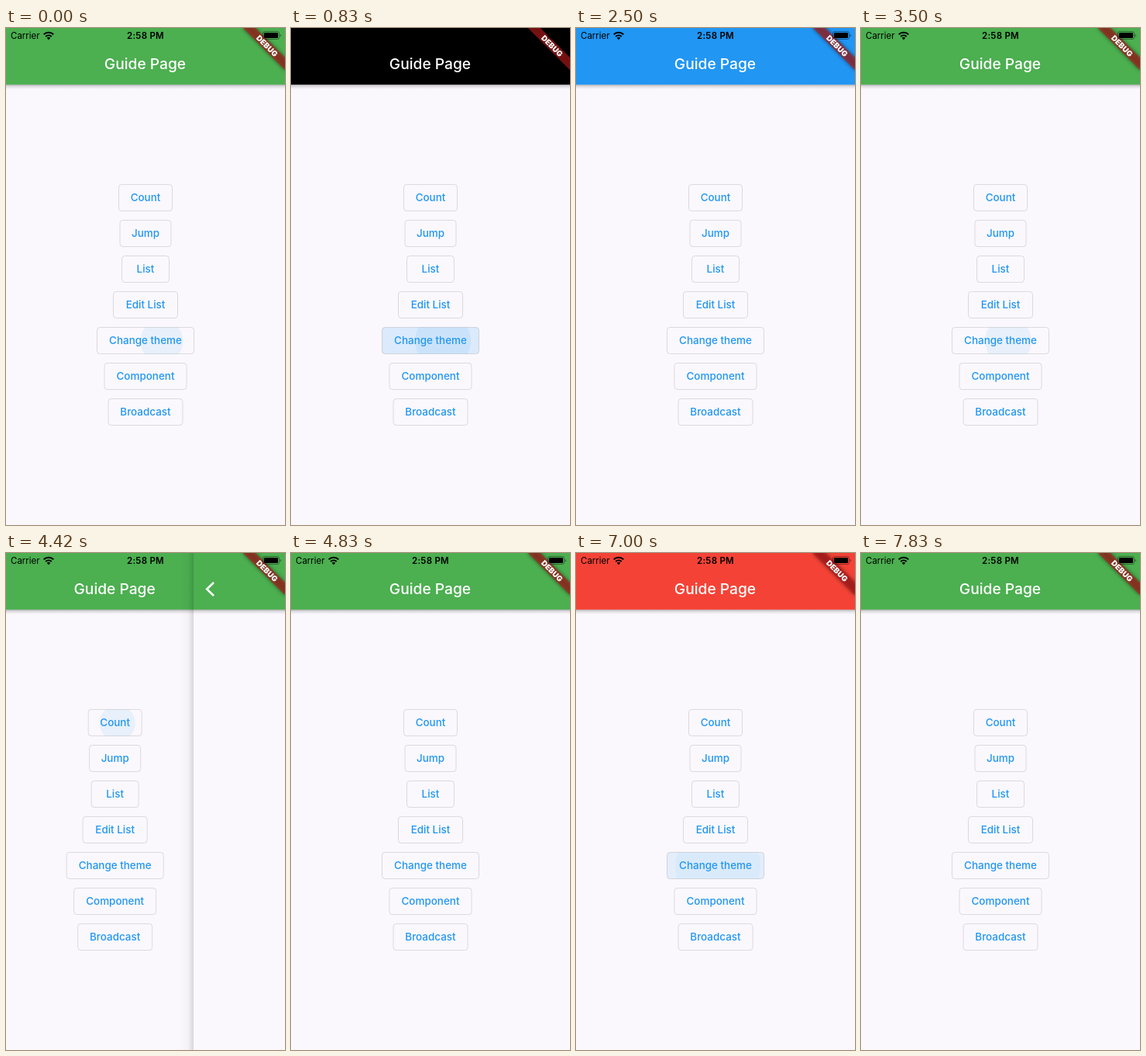
An HTML page for the animation above (8000 ms loop, 360 by 640 pixels).

```html
<!DOCTYPE html>
<html lang="en">
<head>
<meta charset="utf-8">
<title>Guide Page</title>
<style>
html, body { margin: 0; width: 100%; height: 100%; overflow: hidden; background: #faf8fc; }
svg { display: block; width: 360px; height: 640px; font-family: Inter, Roboto, sans-serif; }
.label { font-size: 13.44px; font-weight: 500; fill: #2196f3; text-anchor: middle; }
.title { font-size: 19.2px; font-weight: 500; fill: #fff; text-anchor: middle; }
.status { font-size: 11.5px; }
</style>
</head>
<body>
<svg viewBox="0 0 360 640">
  <defs>
    <linearGradient id="drop" x1="0" y1="0" x2="0" y2="1">
      <stop offset="0" stop-opacity=".3"/>
      <stop offset=".35" stop-opacity=".12"/>
      <stop offset="1" stop-opacity="0"/>
    </linearGradient>
    <linearGradient id="edge">
      <stop offset="0" stop-opacity="0"/>
      <stop offset=".6" stop-opacity=".025"/>
      <stop offset="1" stop-opacity=".14"/>
    </linearGradient>
    <filter id="soft" x="-20%" y="-80%" width="140%" height="260%">
      <feGaussianBlur stdDeviation="2.6"/>
    </filter>
  </defs>

  <g id="guide">
    <rect width="360" height="640" fill="#faf8fc"/>
    <rect y="72.9" width="360" height="6" fill="url(#drop)"/>
    <rect class="bar" width="360" height="72.9"/>
    <text class="title" x="179.5" y="53">Guide Page</text>
    <g id="buttons"></g>
  </g>

  <g id="page">
    <rect x="-18" width="18" height="640" fill="url(#edge)"/>
    <rect width="360" height="640" fill="#faf8fc"/>
    <rect y="72.9" width="360" height="6" fill="url(#drop)"/>
    <rect class="bar" width="360" height="72.9"/>
    <path d="M26 38 17.2 46.5 26 55" fill="none" stroke="#fff" stroke-width="2.6"/>
  </g>

  <g transform="translate(360 0) rotate(45)">
    <rect x="-38.4" y="26.9" width="76.8" height="11.5" opacity=".5" filter="url(#soft)"/>
    <rect x="-38.4" y="26.9" width="76.8" height="11.5" fill="#b71c1c" fill-opacity=".63"/>
    <text y="36.2" font-size="9.8" font-weight="900" fill="#fff" text-anchor="middle">DEBUG</text>
  </g>

  <g class="status">
    <text x="6" y="14">Carrier</text>
    <text x="180" y="14" font-weight="600" letter-spacing=".25" text-anchor="middle">2:58 PM</text>
    <g fill="none" stroke="#000" stroke-width="2">
      <path d="M48.7 8.3a9.2 9.2 0 0 1 12.6 0M51.2 11a5.6 5.6 0 0 1 7.6 0"/>
    </g>
    <path d="M55 15.2 52.8 12.8a3.2 3.2 0 0 1 4.4 0Z"/>
    <rect x="331.5" y="4.5" width="21" height="10" rx="2.4" fill="none" stroke="#000" stroke-opacity=".4"/>
    <rect x="333" y="6" width="18" height="7" rx="1.2"/>
    <path d="M353.7 7.8a1.9 1.9 0 0 1 0 3.6Z" fill-opacity=".45"/>
  </g>
</svg>
<script>
const LOOP = 8000, STEP = 1000 / 12;
const GREEN = '#4caf50', RED = '#f44336', BLACK = '#000', BLUE = '#2196f3';
const THEMES = [GREEN, RED, BLACK, BLUE];
const COUNT = 0, THEME = 4;

const BUTTONS = [
  ['Count', 69], ['Jump', 66], ['List', 61], ['Edit List', 83],
  ['Change theme', 125], ['Component', 106], ['Broadcast', 96]
];

// Each press: step, button, touch x, first radius
const PRESSES = [
  [0, THEME, 201, 27.5],
  [8, THEME, 196, 28], [10, THEME, 196, 36], [12, THEME, 198, 30],
  [13, THEME, 200, 30], [15, THEME, 201, 28], [17, THEME, 201, 30],
  [25, THEME, 199, 30], [42, THEME, 190, 30],
  [53, COUNT, 183, 23],
  ...Array.from({ length: 8 }, (_, i) => [75 + 2 * i, THEME, 183, i ? 30 : 36])
];
const SPLASH = [.085, .05];
const FILL = [0, .1, .14, .1, .05];
const PUSH = 53, PUSH_STEPS = 5;

const byId = id => document.getElementById(id);
const bars = document.querySelectorAll('.bar');

function add(parent, tag, attrs) {
  const node = document.createElementNS('http://www.w3.org/2000/svg', tag);
  for (const key in attrs) node.setAttribute(key, attrs[key]);
  return parent.appendChild(node);
}

const views = BUTTONS.map(([name, width], i) => {
  const group = byId('buttons');
  const box = { x: 180 - width / 2, y: 201.5 + 46 * i, width, height: 34, rx: 3.8 };
  const clip = add(group, 'clipPath', { id: 'clip' + i });
  add(clip, 'rect', box);
  const fill = add(group, 'rect', { ...box, fill: BLUE });
  const inks = add(group, 'g', { 'clip-path': `url(#clip${i})`, fill: BLUE });
  const splashes = SPLASH.map(() => add(inks, 'circle', { cy: 219 + 46 * i }));
  add(group, 'rect', { ...box, fill: 'none', stroke: '#000', 'stroke-opacity': .12 });
  add(group, 'text', { class: 'label', x: 180, y: 223 + 46 * i }).textContent = name;
  return { fill, splashes };
});

function drawInk(step) {
  views.forEach(({ fill, splashes }, i) => {
    let level = 0;
    splashes.forEach(s => s.setAttribute('fill-opacity', 0));
    for (const [start, button, x, r] of PRESSES) {
      const age = step - start;
      if (button !== i || age < 0) continue;
      level = Math.max(level, FILL[age] || 0);
      if (age < SPLASH.length) {
        const s = splashes[age];
        s.setAttribute('cx', x);
        s.setAttribute('r', r + 25 * age);
        s.setAttribute('fill-opacity', SPLASH[age]);
      }
    }
    fill.setAttribute('fill-opacity', level);
  });
}

function draw(time) {
  const step = Math.floor((time % LOOP + 3.4) / STEP);
  const taps = PRESSES.filter(([start, button]) => button === THEME && start > 0 && start <= step);
  const color = THEMES[taps.length % THEMES.length];
  bars.forEach(bar => bar.setAttribute('fill', color));
  drawInk(step);

  const p = (step - PUSH) / PUSH_STEPS;
  const shown = p >= 0 && p < 1 ? 118 * (1 - p) ** 1.6 : 0;
  byId('guide').setAttribute('transform', `translate(${-shown / 3} 0)`);
  byId('page').setAttribute('transform', `translate(${360 - shown} 0)`);
  byId('page').setAttribute('visibility', shown ? 'visible' : 'hidden');
}

const begin = performance.now();
function tick() {
  draw(performance.now() - begin);
  requestAnimationFrame(tick);
}
tick();
</script>
</body>
</html>
```
